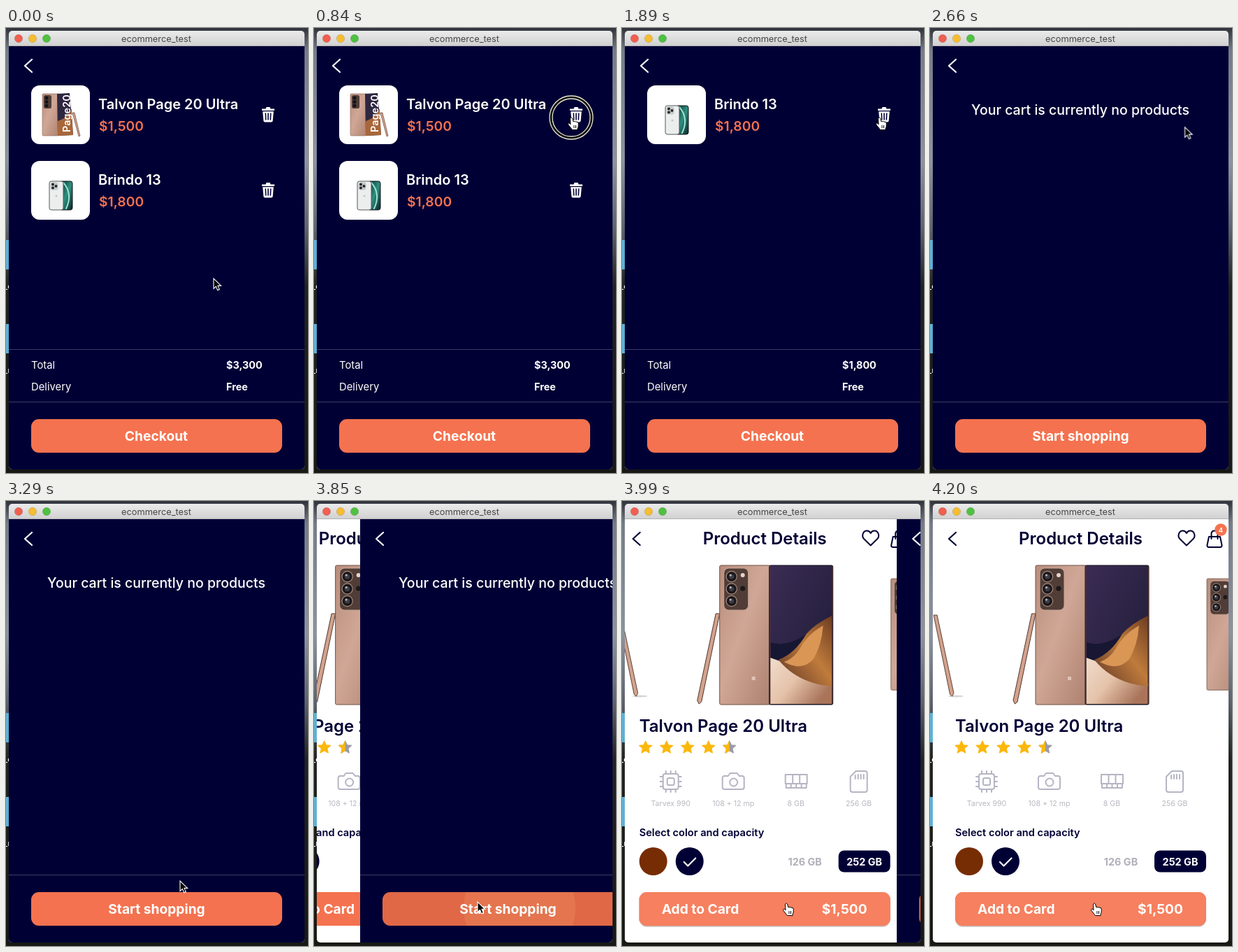
Recreate the animation shown at these times as an HTML page. Size 432 px wide and 636 px high, loop 4.27 s.

```html
<!DOCTYPE html>
<html lang="en">
<head>
<meta charset="utf-8">
<title>ecommerce_test</title>
<style>
  html, body { margin: 0; width: 100%; height: 100%; overflow: hidden; background: #191b1a; }
  svg { display: block; }
  text { font-family: Inter, Roboto, sans-serif; font-weight: 600; }
  .light { fill: #fff; }
  .dark { fill: #010035; }
  .orange { fill: #f4724f; }
  .mid { text-anchor: middle; }
  .name { font-size: 20px; }
  .price { font-size: 19.3px; }
  .sum { font-size: 14.8px; font-weight: 400; }
  .bold { font-size: 14.4px; font-weight: 700; }
  .button { font-size: 19.2px; font-weight: 700; }
  .head { font-size: 24px; }
  .note { font-size: 19.5px; font-weight: 500; }
  .bar { font-size: 12.8px; font-weight: 400; }
  .spec { font-size: 10.6px; font-weight: 400; fill: #b8b8c0; text-anchor: middle; }
  .line { fill: none; stroke-linecap: round; stroke-linejoin: round; }
  .icon { stroke: #b5b5c4; stroke-width: 2; }
  .rule { stroke: #3c3b63; stroke-width: 1; }
</style>
</head>
<body>
<svg width="432" height="636" viewBox="0 0 432 636">
  <defs>
    <linearGradient id="sky" x2="0" y2="1">
      <stop offset="0" stop-color="#30333a"/><stop offset=".05" stop-color="#747b88"/>
      <stop offset=".3" stop-color="#8b93a0"/><stop offset=".45" stop-color="#5d636c"/>
      <stop offset=".58" stop-color="#20231f"/><stop offset="1" stop-color="#171914"/>
    </linearGradient>
    <linearGradient id="bar" x2="0" y2="1">
      <stop offset="0" stop-color="#ebebeb"/><stop offset="1" stop-color="#d0d0d0"/>
    </linearGradient>
    <linearGradient id="bronze" x2="1" y2="1">
      <stop offset="0" stop-color="#b98d7c"/><stop offset=".45" stop-color="#d0a796"/><stop offset="1" stop-color="#ae8170"/>
    </linearGradient>
    <linearGradient id="night" x2="1" y2="1">
      <stop offset="0" stop-color="#3b2c54"/><stop offset=".6" stop-color="#292242"/><stop offset="1" stop-color="#171630"/>
    </linearGradient>
    <linearGradient id="amber" x1="1" x2="0" y2="1">
      <stop offset="0" stop-color="#6b3c22"/><stop offset=".45" stop-color="#bf7b3c"/><stop offset="1" stop-color="#5e3426"/>
    </linearGradient>
    <linearGradient id="cream" x2="1" y2=".6">
      <stop offset="0" stop-color="#f0dccc"/><stop offset=".5" stop-color="#e5c3aa"/><stop offset="1" stop-color="#a9745a"/>
    </linearGradient>
    <linearGradient id="teal" x2="1" y2="1">
      <stop offset="0" stop-color="#0b2a2e"/><stop offset=".5" stop-color="#2f8f80"/><stop offset="1" stop-color="#0b2328"/>
    </linearGradient>
    <clipPath id="frame"><rect x="4" y="4" width="423" height="627" rx="5"/></clipPath>
    <clipPath id="pill"><rect x="36" y="559" width="359" height="48" rx="11"/></clipPath>

    <g id="trash">
      <path class="light" d="M-9 -8.5h5.5l1-2.5h5l1 2.5h5.5v2.6h-18zM-7.8 -4.8h15.6l-1.2 13.6q-.2 1.7-2 1.7h-9.2q-1.8 0-2-1.7z"/>
      <path class="line" stroke="#010035" stroke-width="1.6" d="M-3.7 -2l.4 9M0 -2v9M3.7 -2l-.4 9"/>
    </g>
    <path id="back" class="line" stroke-width="2.2" d="M37 45l-10 9 10 9"/>
    <path id="star" stroke-width="1.2" stroke-linejoin="round" d="M0 -9L2.6 -3.2 9 -2.6 4.2 1.6 5.6 8 0 4.7 -5.6 8 -4.2 1.6 -9 -2.6 -2.6 -3.2z"/>
    <g id="lens">
      <circle r="7.6" fill="#1b1719" stroke="#a58a7d" stroke-width="1.2"/>
      <circle r="3.6" fill="#3d3d49"/><circle cx="-1.5" cy="-2" r="1.6" fill="#b4b6bd"/>
    </g>
    <g id="phone">
      <rect width="73" height="199" rx="2" fill="url(#bronze)" stroke="#6f5145"/>
      <rect x="6" y="4" width="35" height="60" rx="7" fill="#513d37" stroke="#c7a797"/>
      <use href="#lens" x="17" y="16"/><use href="#lens" x="17" y="33.5"/><use href="#lens" x="17" y="51"/>
      <circle cx="33" cy="14" r="3" fill="#e5d3c8"/><circle cx="33" cy="33" r="3.6" fill="#1d1819"/>
      <rect x="46" y="159" width="5" height="5" fill="#e0c3b5"/>
      <rect x="71" width="91" height="199" rx="2" fill="url(#night)" stroke="#19131a"/>
      <path fill="#171733" d="M73 110Q96 118 128 96L92 142 73 132z"/>
      <path fill="url(#cream)" d="M72.500 132l17 6q26 26 71 30v30H72.500z"/>
      <path fill="url(#amber)" d="M160.500 72Q136 84 124 98 108 126 84 135q28 34 76.500 38z"/>
      <path fill="#d99655" d="M148 86Q126 98 114 120q-8 13-22 18 26 14 42-4 12-20 14-48z"/>
      <path class="line" stroke="#543528" d="M72 1v197M161.500 2v195"/>
    </g>
    <path id="stylus" d="M-3.500 0L2 0 -24 126 -27.500 129 -30 124z" fill="#d3a28d" stroke="#4f372f"/>
  </defs>

  <rect width="432" height="636" fill="url(#sky)"/>
  <rect y="303" width="6" height="42" fill="#5fb0d3"/><rect y="423" width="6" height="42" fill="#5fb0d3"/>
  <g class="light" font-size="11"><text x="-3" y="373">_c</text><text x="-3" y="493">_r</text></g>

  <g clip-path="url(#frame)">
    <g id="shop">
      <rect x="4" y="26" width="564" height="605" fill="#fff"/>
      <use href="#back" stroke="#010035"/>
      <text class="dark head mid" x="215.500" y="62">Product Details</text>
      <g class="line" stroke="#010035" stroke-width="2">
        <path d="M367 63.500L357.300 54C353.700 50 356 42.500 361.600 42.500 364.300 42.500 366 44 367 46 368 44 369.700 42.500 372.400 42.500 378 42.500 380.300 50 376.700 54z"/>
        <path d="M399 51h16l2.500 12q.3 3-2.500 3h-16q-2.800 0-2.500-3zM402.500 54v-7q0-4.500 4.500-4.500t4.500 4.500v7"/>
      </g>
      <circle class="orange" cx="416" cy="41" r="8.700"/>
      <text class="light mid" x="416" y="44.500" font-size="9.500">4</text>

      <ellipse cx="37" cy="279" rx="11" ry="1.500" fill="#d8d4d2"/>
      <use href="#stylus" transform="translate(7 163) scale(-.9 .9)"/>
      <use href="#stylus" x="149" y="161"/>
      <use href="#phone" x="151" y="92"/>
      <use href="#phone" transform="translate(396 111) scale(.8)"/>

      <text class="dark head" x="36" y="330">Talvon Page 20 Ultra</text>
      <g fill="#fbb80c" stroke="#fbb80c">
        <use href="#star" x="45" y="352"/><use href="#star" x="75" y="352"/>
        <use href="#star" x="105" y="352"/><use href="#star" x="135" y="352"/>
        <use href="#star" x="165" y="352" fill="#9b9ba6" stroke="#9b9ba6"/>
        <path stroke-width="1.200" stroke-linejoin="round" d="M164.400 344.300v12.700L159.400 360 160.800 353.600 156 349.400 162.400 348.800z"/>
      </g>

      <g class="line icon">
        <rect x="70" y="390" width="22" height="22" rx="3"/><rect x="76" y="396" width="10" height="10" rx="2"/>
        <path d="M74 390v-4M81 390v-4M88 390v-4M74 416v-4M81 416v-4M88 416v-4M70 394h-4M70 401h-4M70 408h-4M96 394h-4M96 401h-4M96 408h-4"/>
        <path d="M158 393h5l3-4h10l3 4h4q3 0 3 3v13q0 3-3 3h-25q-3 0-3-3v-13q0-3 3-3z"/>
        <circle cx="171" cy="402" r="5.500"/>
        <path d="M245 391h31v13h-31zM246 404v6h29v-6M253 405v5M260.500 405v5M268 405v5M255.500 391v13M265.500 391v13"/>
        <path d="M346 386h13q3 0 3 3v24q0 3-3 3h-18q-3 0-3-3v-19zM345 392v5M349 391v6M353 391v6M357 391v6"/>
      </g>
      <text class="spec" x="81" y="436">Tarvex 990</text>
      <text class="spec" x="170.500" y="436">108 + 12 mp</text>
      <text class="spec" x="260" y="436">8 GB</text>
      <text class="spec" x="350" y="436">256 GB</text>

      <text class="dark" x="36" y="479" font-size="14.600">Select color and capacity</text>
      <circle cx="56" cy="515" r="20" fill="#772d03"/>
      <circle class="dark" cx="108" cy="515" r="20"/>
      <path class="line" stroke="#fff" stroke-width="2.200" d="M100 516l5.500 5.500 11-11"/>
      <text class="bold mid" x="273" y="521" fill="#b0b0bb">126 GB</text>
      <rect class="dark" x="321" y="499.500" width="74" height="31" rx="8"/>
      <text class="bold mid light" x="358" y="521">252 GB</text>

      <g id="lift">
        <rect x="36" y="561" width="359" height="48" rx="11" fill="#d9d2d0"/>
        <rect x="36" y="560" width="359" height="48" rx="11" fill="#c9b5ae"/>
      </g>
      <rect class="orange" x="36" y="559" width="359" height="48" rx="11"/>
      <rect id="glow" x="36" y="559" width="359" height="48" rx="11" fill="#f6805f"/>
      <text class="button light" x="68" y="590">Add to Card</text>
      <text class="button light" x="362" y="590" text-anchor="end">$1,500</text>
    </g>

    <g id="cart">
      <rect class="dark" x="4" y="26" width="423" height="605"/>
      <use href="#back" stroke="#fff"/>

      <g id="first">
        <rect class="light" x="36" y="82" width="84" height="84" rx="12"/>
        <rect x="52" y="94" width="24" height="60" rx="1.500" fill="url(#bronze)" stroke="#8a6555" stroke-width=".6"/>
        <rect x="54" y="96" width="11" height="19" rx="2.500" fill="#513d37"/>
        <g fill="#15131a"><circle cx="58" cy="100" r="2.500"/><circle cx="58" cy="105.500" r="2.500"/><circle cx="58" cy="111" r="2.500"/></g>
        <path fill="#2e2740" d="M73 94l18-1 5 60-22 1z"/>
        <path fill="#a8673a" d="M74 133q14-4 20-18l2 38-22 1z"/>
        <path d="M95 121l3 0 8 33-2 1z" fill="#d3a28d" stroke="#4f372f" stroke-width=".6"/>
        <text transform="translate(92 149) rotate(-90)" font-size="14.500" class="light">Page20</text>
        <text class="name light" x="132" y="116">Talvon Page 20 Ultra</text>
        <text class="price orange" x="133" y="147">$1,500</text>
        <use href="#trash" x="375" y="124"/>
      </g>

      <g id="second">
        <rect class="light" x="36" y="190" width="84" height="84" rx="12"/>
        <rect x="77" y="219" width="18" height="41" rx="3" fill="url(#teal)" stroke="#11191d"/>
        <path d="M82 221q14 16 4 37" class="line" stroke="#9be3cd" stroke-width="2"/>
        <rect x="62" y="219" width="20" height="41" rx="3" fill="#eceeee" stroke="#54585a"/>
        <rect x="63.500" y="220.500" width="11" height="11" rx="3" fill="#c5c9c9"/>
        <g fill="#25292b"><circle cx="67" cy="223.500" r="2"/><circle cx="67" cy="228.500" r="2"/><circle cx="71.500" cy="226" r="2"/></g>
        <circle cx="72" cy="240" r="1.500" fill="#c2c5c6"/>
        <text class="name light" x="132" y="224">Brindo 13</text>
        <text class="price orange" x="133" y="255">$1,800</text>
        <use href="#trash" x="375" y="232"/>
      </g>

      <g id="totals" class="light">
        <path class="rule" d="M4 459.500h423"/>
        <text class="sum" x="36" y="487">Total</text>
        <text class="sum" x="36" y="518">Delivery</text>
        <text class="bold" x="315" y="487" id="both">$3,300</text>
        <text class="bold" x="315" y="487" id="one">$1,800</text>
        <text class="bold" x="315" y="518">Free</text>
      </g>
      <path class="rule" d="M4 534.500h423"/>
      <text id="empty" class="light mid note" x="215" y="124">Your cart is currently no products</text>

      <g clip-path="url(#pill)">
        <rect class="orange" x="36" y="559" width="359" height="48"/>
        <rect id="hover" x="36" y="559" width="359" height="48" fill="#f6805f"/>
        <g id="press">
          <rect x="36" y="559" width="359" height="48" fill="#e06846"/>
          <circle id="ripple" cx="232" cy="582" r="0" fill="#e4754f"/>
        </g>
      </g>
      <text id="checkout" class="button light mid" x="215" y="590">Checkout</text>
      <text id="start" class="button light mid" x="215.500" y="590">Start shopping</text>
    </g>

    <rect x="4" y="4" width="423" height="22" fill="url(#bar)"/>
    <path d="M4 25.500h423" stroke="#b3b1b4"/>
    <g stroke="#000" stroke-opacity=".12">
      <circle cx="18" cy="15" r="5.700" fill="#f05f50"/><circle cx="38" cy="15" r="5.700" fill="#f6bd32"/><circle cx="58" cy="15" r="5.700" fill="#4fc141"/>
    </g>
    <text class="mid bar" x="215" y="20" fill="#474747">ecommerce_test</text>
  </g>

  <g id="cursor">
    <g id="ring" fill="none">
      <circle r="29" stroke="#090914" stroke-width="4"/>
      <circle r="31" stroke="#e9e8cb" stroke-width="1.300"/><circle r="27" stroke="#e9e8cb" stroke-width="1.300"/>
    </g>
    <path id="arrow" d="M0 0v14.500l3.400-3.100 2.300 5.300 2.600-1.100-2.300-5.200h4.600z" fill="#000" stroke="#fff" stroke-width="1.100"/>
    <path id="hand" fill="#fff" stroke="#000" d="M-1.500 1Q0-1.500 1.500 1L3 6q1-1.500 2.500 0 1.500-1.200 2.500.5 2-.8 2.200 1.500v4q-.2 2-1.200 3.500V17.500H1.500L-4 10.500q-1.200-2 .5-2.500 1.500 0 2.500 1.800z M4 11v4M6.500 11v4"/>
  </g>
</svg>
<script>
const LOOP = 4270, STEP = 70;
const animations = [];

// Keys are [ms, value, easing]; the easing leads to the next key.
function track(id, prop, keys) {
  const frame = ([ms, value, easing = 'linear']) => ({ offset: ms / LOOP, [prop]: value, easing });
  const all = [[0, keys[0][1]], ...keys, [LOOP, keys.at(-1)[1]]];
  const anim = document.getElementById(id).animate(all.map(frame), { duration: LOOP, fill: 'both' });
  anim.pause();
  animations.push(anim);
}

// Hard switches: visible only inside the given [from, to] spans.
function show(id, ...spans) {
  const keys = [[0, 0, 'steps(1)']];
  for (const [from, to] of spans) keys.push([from, 1, 'steps(1)'], [to, 0, 'steps(1)']);
  track(id, 'opacity', keys);
}

const at = (x, y = 0) => `translate(${x}px, ${y}px)`;
const REMOVE_1 = 980, REMOVE_2 = 2030, PRESS = 3780;

show('first', [0, REMOVE_1]);
show('second', [0, REMOVE_2]);
track('second', 'transform', [[0, at(0), 'steps(1)'], [REMOVE_1, at(0, -108)]]);
show('both', [0, REMOVE_1]);
show('one', [REMOVE_1, LOOP]);
show('totals', [0, REMOVE_2]);
show('checkout', [0, REMOVE_2]);
show('empty', [REMOVE_2, LOOP]);
show('start', [REMOVE_2, LOOP]);

show('hover', [3010, 3220], [3570, PRESS]);
show('press', [PRESS, LOOP]);
track('ripple', 'r', [[3740, '0px'], [3850, '80px'], [4000, '180px']]);
show('lift', [3990, LOOP]);
show('glow', [3990, LOOP]);

const slide = 'cubic-bezier(.35,.91,.33,.97)';
const SLIDE_FROM = 3832.3, SLIDE_TO = 4148;
track('cart', 'transform', [[SLIDE_FROM, at(0), slide], [SLIDE_TO, at(423)]]);
track('shop', 'transform', [[SLIDE_FROM, at(-141), slide], [SLIDE_TO, at(0)]]);

track('cursor', 'transform', [
  [0, at(297, 358), 'ease-in-out'], [560, at(368, 128)],
  [2590, at(368, 128), 'ease-in-out'], [3150, at(257, 566)],
  [3290, at(249, 543), 'ease-in-out'], [3710, at(234, 573)],
  [3850, at(234, 573)], [3990, at(235, 575)],
]);
show('hand', [490, REMOVE_2], [3010, 3220], [3570, 3850], [3990, LOOP]);
show('arrow', [0, 490], [REMOVE_2, 3010], [3220, 3570], [3850, 3990]);
show('ring', [840, 980], [1960, REMOVE_2], [PRESS, 3850]);

const start = performance.now();
function tick() {
  const now = Math.max(0, performance.now() - start) % LOOP;
  const time = Math.floor(now / STEP) * STEP;
  for (const anim of animations) anim.currentTime = time;
  requestAnimationFrame(tick);
}
tick();
</script>
</body>
</html>
```
